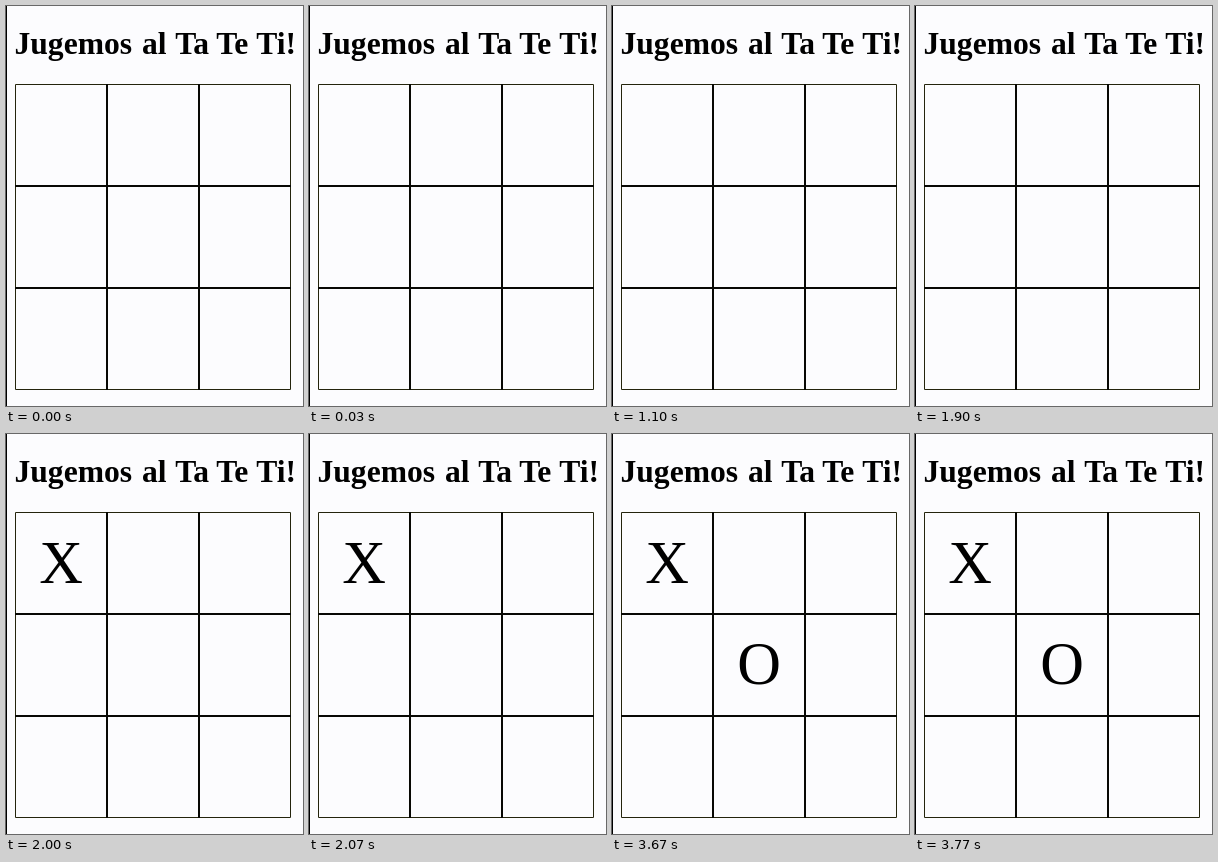
An HTML page for the animation above (8 s loop, 297 by 400 pixels).

```html
<!DOCTYPE html>
<html lang="es">
<head>
<meta charset="utf-8">
<title>Ta Te Ti</title>
<style>
  html, body { margin: 0; width: 100%; height: 100%; overflow: hidden; background: #fcfcfe; }
  svg { display: block; width: 100%; height: 100%; }
  text { font-family: "Liberation Serif", "Times New Roman", serif; fill: #000; }
  .title { font-size: 31.6px; font-weight: bold; }
  .mark { font-size: 60.5px; text-anchor: middle; opacity: 0; }
  .thin { stroke: #24240c; stroke-width: 1; }
  .thick { stroke: #080804; stroke-width: 2; }
</style>
</head>
<body>
<svg viewBox="0 0 297 400">
  <rect width="1" height="400"/>
  <text class="title" y="48"><tspan x="8.5">Jugemos</tspan> <tspan x="136">al</tspan> <tspan x="169.2">Ta</tspan> <tspan x="210.2">Te</tspan> <tspan x="250.3">Ti!</tspan></text>
  <path class="thin" fill="none" d="M9.5 78.5H284.5V383.5H9.5Z"/>
  <path class="thick" d="M101 78V384M193 78V384M9 180H285M9 282H285"/>
  <text class="mark" id="x" x="55" y="148.5">X</text>
  <text class="mark" id="o" x="147" y="249.8">O</text>
</svg>
<script>
  const LOOP = 8000;
  const moves = [["x", 2000], ["o", 3670]];

  for (const [id, time] of moves) {
    document.getElementById(id).animate([
      { opacity: 0, offset: 0, easing: "step-end" },
      { opacity: 1, offset: time / LOOP },
      { opacity: 1, offset: 1 }
    ], { duration: LOOP, iterations: Infinity });
  }
</script>
</body>
</html>
```
